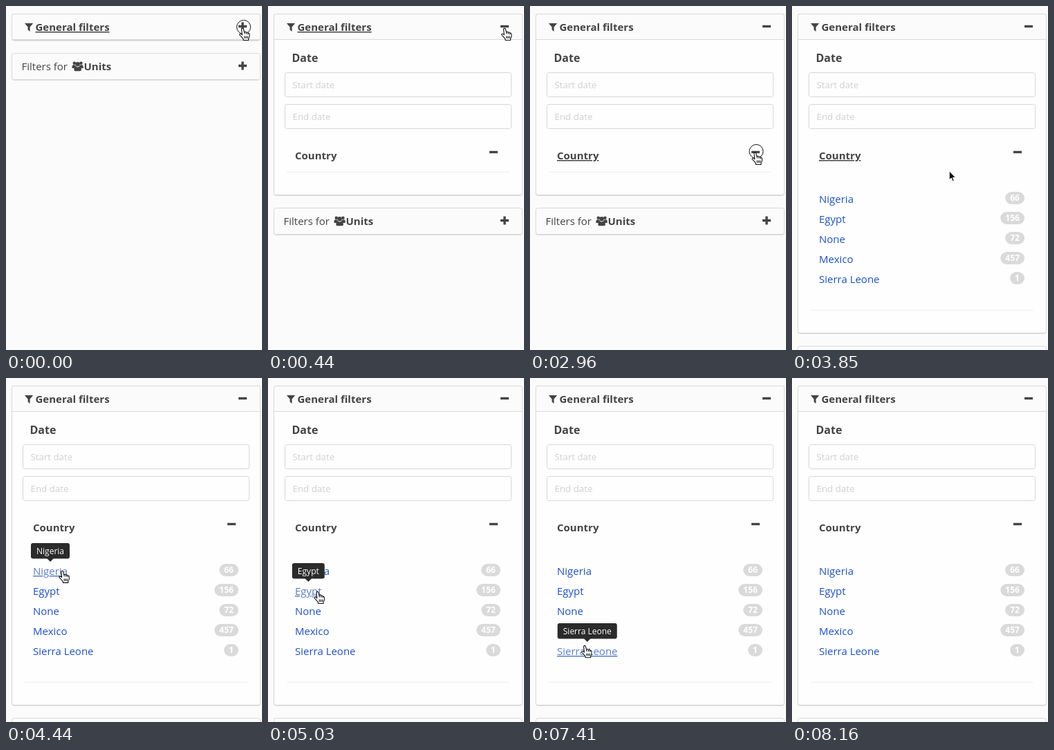
Write an HTML page that moves like this. It is 370x498 px and loops after 9.06 s.

```html
<!DOCTYPE html>
<html lang="en">
<head>
<meta charset="utf-8">
<title>Filter panel</title>
<style>
html, body { margin: 0; width: 100%; height: 100%; overflow: hidden; background: #fbfbfb; }
svg { display: block; font: 15px "Open Sans", sans-serif; fill: #444; }
.b { font-weight: 700; }
.hint { font-size: 13.3px; fill: #d0d0d0; }
.box { fill: #fefefe; stroke: #d6d6d6; }
.head { fill: #fbfbfb; stroke: #d9d9d9; }
.shade { fill: none; stroke: #dedede; }
.sign { stroke: #444; stroke-width: 3.4; }
.line { stroke: #eee; }
.link { fill: #1c50c8; }
.link.on { fill: #5b7ecb; }
.on { text-decoration: underline; }
.badge { fill: #dadada; }
.count { font: 700 12px "Open Sans", sans-serif; fill: #fff; text-anchor: middle; }
.tip { font-size: 12px; fill: #fff; text-anchor: middle; }
</style>
</head>
<body>
<svg width="370" height="498" viewBox="0 0 370 498">
  <defs>
    <clipPath id="bodyClip"><rect id="bodyArea" x="8" y="49" width="360"/></clipPath>
    <clipPath id="listClip"><rect id="listArea" x="8" y="240" width="360"/></clipPath>
  </defs>

  <rect class="shade" id="shade" x="8.5" y="12.5" width="359" rx="3"/>
  <rect class="box" id="card" x="8.5" y="11.5" width="359" rx="3"/>
  <path class="head" d="M8.5 48.5V14.5a3 3 0 0 1 3-3h353a3 3 0 0 1 3 3V48.5z" id="head"/>
  <path d="M27 25h12.200l-4.600 5.500v6.500l-3-2.600v-3.900z"/>
  <text class="b" id="general" x="42.500" y="36">General filters</text>
  <path class="sign" id="sign"/>

  <g clip-path="url(#bodyClip)">
    <text class="b" x="34.500" y="81" font-size="16">Date</text>
    <rect class="box" x="24.500" y="96.500" width="327" height="35" rx="3"/>
    <text class="hint" x="35.500" y="119">Start date</text>
    <rect class="box" x="24.500" y="142.500" width="327" height="35" rx="3"/>
    <text class="hint" x="35.500" y="165">End date</text>
    <text class="b" id="country" x="39" y="222">Country</text>
    <path class="sign" d="M320 211.500h12"/>
    <g id="list" clip-path="url(#listClip)"></g>
    <path class="line" id="rule" d="M27 240.500h322"/>
  </g>

  <g id="units">
    <rect class="shade" x="8.500" y="69.500" width="359" height="38" rx="3"/>
    <rect class="head" x="8.500" y="68.500" width="359" height="38" rx="3"/>
    <text x="22.500" y="93">Filters for</text>
    <circle cx="98.800" cy="82.700" r="2.300"/>
    <circle cx="108.400" cy="82.700" r="2.300"/>
    <circle cx="103.600" cy="84.200" r="3.200"/>
    <path d="M95.500 90v-2.500q0-2.300 2-2.300l3 .5q0 1.500 1 2.300-2 .3-2.500 2zM111.700 90v-2.500q0-2.300-2-2.300l-3 .5q0 1.500-1 2.300 2 .3 2.500 2z"/>
    <path d="M98.300 92.300q0-4.500 3-4.500 2.300 1.300 4.600 0 3 0 3 4.500 0 2-2 2h-6.600q-2 0-2-2z"/>
    <text class="b" x="112.500" y="93">Units</text>
    <path class="sign" d="M336 86.500h12m-6-6v12"/>
  </g>

  <g id="tooltip">
    <rect id="tipBox" height="22.500" rx="3" fill="#2b2b2b"/>
    <path d="M-5 22h10l-5 5z" fill="#2b2b2b"/>
    <text class="tip" id="tipText" y="15.500"></text>
  </g>

  <g id="cursor">
    <circle id="ring" cx="2" cy="-1.500" r="10" fill="none" stroke="#111"/>
    <g id="hand" stroke="#111" stroke-width="1.100" stroke-linejoin="round">
      <path fill="#fff" d="M-1 1.200C-.6-.3 1.200-.3 1.700 1.200L3 6C3.600 5 5.300 5 5.700 6.300 6.500 5.700 7.900 5.900 8.200 7.200 9.300 6.800 10.300 7.500 10.400 9V12L9 15.500V17.500H1.500V16C0 13.500-2.500 11.500-4 9.500-4 7.800-2 7.600-.2 9.800z"/>
      <path fill="none" d="M3 6l.5 2.500M5.700 6.300l.3 2.500M8.200 7.200v2M3.300 11.500v3.500M5.400 11.500v3.500M7.500 11.500v3.500"/>
    </g>
    <path id="arrow" fill="#111" stroke="#fff" d="M0 0V13L3 10.300 5 15 7.200 14 5.200 9.600H9.300z"/>
  </g>
</svg>
<script>
const LOOP = 9060;
const $ = id => document.getElementById(id);
const set = (el, attrs) => { for (const k in attrs) el.setAttribute(k, attrs[k]); };
const show = (el, on) => set(el, { visibility: on ? "visible" : "hidden" });
const add = (tag, attrs, text = "") => {
  const el = document.createElementNS("http://www.w3.org/2000/svg", tag);
  set(el, attrs);
  el.textContent = text;
  return $("list").appendChild(el);
};

const rows = [["Nigeria", 66], ["Egypt", 156], ["None", 72], ["Mexico", 457], ["Sierra Leone", 1]];
const links = rows.map(([name, count], i) => {
  const y = 285 + 29 * i, w = 14 + 6.9 * String(count).length;
  add("rect", { class: "badge", x: 336 - w, y: y - 16, width: w, height: 18, rx: 9 });
  add("text", { class: "count", x: 336 - w / 2, y: y - 2.7 }, count);
  return { name, y, el: add("text", { class: "link", x: 39, y }, name) };
});

// Cursor moves: start, end, steps, target x, target y
const moves = [
  [1190, 2070, 7, 325, 212],
  [3850, 4590, 6, 66, 283],
  [4890, 5030, 2, 71, 309],
  [5330, 5770, 4, 70, 342],
  [6070, 6220, 2, 76, 371],
  [7270, 7560, 3, 80, 396],
  [7860, 8160, 3, 221, 435]
];

// Steps taken so far; the first falls on start, the last on end
const stepAt = (t, start, end, n) =>
  t < start ? 0 : Math.min(n, 1 + Math.floor((t - start) / (end - start) * (n - 1) + 1e-6));

function cursorAt(t) {
  let x = 341.5, y = 32;
  for (const [start, end, n, tx, ty] of moves) {
    const e = 1 - (1 - stepAt(t, start, end, n) / n) ** 2.6;
    x += (tx - x) * e;
    y += (ty - y) * e;
  }
  return [x, y];
}

function draw(t) {
  const opened = [0, 120, 249, 224][stepAt(t, 140, 440, 3)];
  const listed = [0, 0, 60, 150, 190, 200][stepAt(t, 2820, 3410, 5)];
  const grown = opened + listed;
  set($("card"), { height: 38 + grown });
  set($("shade"), { height: 38 + grown });
  set($("bodyArea"), { height: grown });
  set($("listArea"), { height: listed });
  set($("rule"), { transform: `translate(0 ${listed})` });
  set($("units"), { transform: `translate(0 ${grown})` });
  set($("sign"), { d: opened ? "M336 29.500h12" : "M336 29.500h12m-6-6v12" });

  const [x, y] = cursorAt(t);
  const present = t < 8160;
  const inHead = y < 49, inCountry = y > 196 && y < 242;
  $("general").classList.toggle("on", inHead);
  $("country").classList.toggle("on", inCountry);

  let hovered = null;
  for (const link of links) {
    const width = link.el.getComputedTextLength();
    const on = present && listed > 0 && x < 39 + width && y > link.y - 16 && y < link.y + 8;
    link.el.classList.toggle("on", on);
    if (!on) continue;
    hovered = link;
    $("tipText").textContent = link.name;
    const w = $("tipText").getComputedTextLength() + 16;
    set($("tipBox"), { x: -w / 2, width: w });
    set($("tooltip"), { transform: `translate(${39 + width / 2} ${link.y - 46})` });
  }
  show($("tooltip"), hovered);

  const hand = inHead || hovered || (inCountry && y < 235);
  set($("cursor"), { transform: `translate(${x} ${y})` });
  show($("hand"), present && hand);
  show($("arrow"), present && !hand);
  show($("ring"), t < 140 || stepAt(t, 2820, 3410, 5) === 1);
}

const begin = performance.now();
function frame() {
  draw((performance.now() - begin) % LOOP);
  requestAnimationFrame(frame);
}
frame();
</script>
</body>
</html>
```
